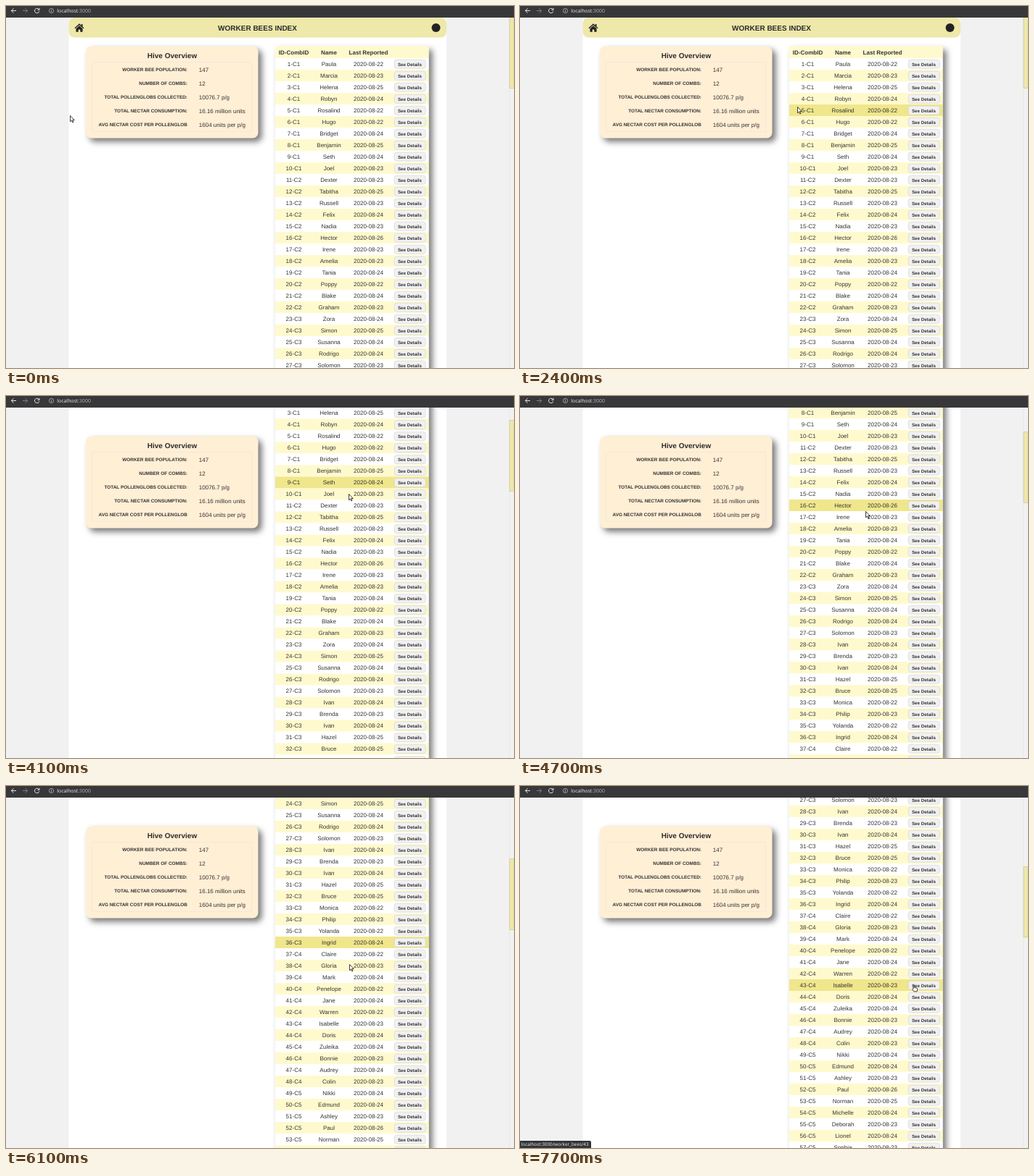
Animation, 700 px wide and 500 px high, one loop 8000 ms. Source, as an HTML page:

```html
<!DOCTYPE html>
<html lang="en">
<head>
<meta charset="utf-8">
<title>Worker Bees Index</title>
<style>
html, body { margin: 0; height: 100%; overflow: hidden; background: #f1f1f1; }
svg { display: block; width: 100vw; height: 100vh; }
text { font: 8px "Liberation Sans", Arial, sans-serif; fill: #333; text-rendering: geometricPrecision; }
.b { font-weight: bold; }
.h { font-weight: bold; font-size: 10px; fill: #2b2b2b; }
.l { font-weight: bold; font-size: 6.43px; }
.d { font-weight: bold; font-size: 6.2px; }
.ui { font: 6.86px "Noto Sans", sans-serif; fill: #e4e4e4; }
.m { text-anchor: middle; }
.e { text-anchor: end; }
.shade { filter: drop-shadow(5px 5px 4px #777); }
</style>
</head>
<body>
<svg viewBox="0 0 700 500">
  <rect x="86.5" width="520.5" height="500" fill="#fff"/>
  <g id="page">
    <rect x="86.5" y="16" width="520.5" height="27.5" rx="8" fill="#eee8aa"/>
    <path d="M94.5 30.2 101 24.3l2.8 2.5v-1.7h1.7v3.3l2 1.8-.9 1-5.6-5-5.6 5zM96.5 31.2l4.5-4 4.5 4v4.6h-3.2v-3.4h-2.6v3.4h-3.2z" fill="#222"/>
    <circle cx="592.5" cy="30" r="6" fill="#222"/>
    <text class="h m" x="346.5" y="33.5">WORKER BEES INDEX</text>
    <rect class="shade" x="371" y="55.5" width="211.5" height="1100" fill="#fff"/>
    <rect x="371" y="55.5" width="211.5" height="16.5" fill="#fffacd"/>
    <text class="b m" x="396.5" y="66.6">ID-CombID</text>
    <text class="b m" x="445" y="66.6">Name</text>
    <text class="b m" x="499.5" y="66.6">Last Reported</text>
    <g id="rows"></g>
  </g>
  <g id="card">
    <rect class="shade" x="110" y="55.5" width="237.5" height="127" rx="7.5" fill="#ffefd5"/>
    <rect x="118.7" y="77.7" width="220" height="96" fill="none" stroke="#eee6da" stroke-width=".7"/>
    <text class="h m" x="229" y="72.2">Hive Overview</text>
  </g>
  <rect x="693.5" y="16" width="6.5" height="484" fill="#f1f1f1"/>
  <path d="M693.7 16V500" stroke="#ddd" stroke-width=".5"/>
  <rect id="thumb" x="694" y="16" width="6" height="97.5" fill="#eee8aa" stroke="#bbb58c" stroke-width=".5"/>
  <rect width="700" height="16" fill="#38383a"/>
  <g fill="none" stroke="#e8e8e8" stroke-width="1">
    <path d="M14 6.5H7.5M10.5 3.3 7.3 6.5l3.2 3.2"/>
    <path d="M23 6.5h6.500M26.500 3.300l3.200 3.200-3.200 3.200" stroke="#808083"/>
    <path d="M45.200 4.500a3.200 3.200 0 1 0 .6 2.800M46 2.900v2.500h-2.500"/>
    <circle cx="62.500" cy="6.500" r="3.100" stroke="#ccc" stroke-width=".7"/>
    <path d="M62.500 6v2.200M62.500 4.600v.8" stroke="#ccc" stroke-width=".8"/>
  </g>
  <text class="ui" x="70.3" y="9">localhost<tspan fill="#b0b0b2">:3000</tspan></text>
  <g id="status">
    <path d="M0 490H96q2 0 2 2v8H0z" fill="#343538"/>
    <text class="ui" id="link" x="1.7" y="497.300" style="font-size:6.35px"></text>
  </g>
  <g fill="#fff" stroke="#111" stroke-width=".8" stroke-linejoin="round">
    <path id="arrow" d="M.5.5V8.800L2.400 7 3.700 9.900 5 9.300 3.700 6.500H6.200z"/>
    <path id="hand" d="M-.8 5V.8q.8-1 1.600 0V3.500l3 .7q.9.3.8 1.300L4.100 8.800H-.2L-2.300 6q0-1 .8-.9z"/>
  </g>
</svg>
<script>
const $ = id => document.getElementById(id);

const names = `Paula Marcia Helena Robyn Rosalind Hugo Bridget Benjamin Seth Joel
Dexter Tabitha Russell Felix Nadia Hector Irene Amelia Tania Poppy Blake Graham
Zora Simon Susanna Rodrigo Solomon Ivan Brenda Ivan Hazel Bruce Monica Philip Yolanda Ingrid
Claire Gloria Mark Penelope Jane Warren Isabelle Doris Zuleika Bonnie Audrey Colin
Nikki Edmund Ashley Paul Norman Michelle Deborah Lionel Sophia Trevor`.split(/\s+/);
const days = "2354224543353436334243454434345523242342423443434436543434";
const combStarts = [1, 11, 23, 37, 49];

const stripe = n => n % 2 ? "#fff" : "#fffacd";
$("rows").innerHTML = names.map((name, i) => {
  const n = i + 1, top = 56 + 16 * n, base = top + 10.7;
  const comb = combStarts.filter(start => start <= n).length;
  return `<rect x="371" y="${top}" width="211.5" height="16" fill="${stripe(n)}"/>
    <text class="m" x="396.5" y="${base}">${n}-C${comb}</text>
    <text class="m" x="445" y="${base}">${name}</text>
    <text class="m" x="499.5" y="${base}">2020-08-2${days[i]}</text>
    <rect x="535.2" y="${top + 2.2}" width="43" height="12" rx="3" fill="#f1f1f1" stroke="#d0d0d0" stroke-width=".6"/>
    <text class="d m" x="556.5" y="${top + 10.5}">See Details</text>`;
}).join("");
const bands = [...$("rows").querySelectorAll("rect[x='371']")];

$("card").innerHTML += [
  ["WORKER BEE POPULATION:", "147"],
  ["NUMBER OF COMBS:", "12"],
  ["TOTAL POLLENGLOBS COLLECTED:", "10076.7 p/g"],
  ["TOTAL NECTAR CONSUMPTION:", "16.16 million units"],
  ["AVG NECTAR COST PER POLLENGLOB", "1604 units per p/g"]
].map(([label, value], i) =>
  `<text class="l e" x="250" y="${90.4 + 19 * i}">${label}</text>
   <text x="265.800" y="${90.5 + 19 * i}">${value}</text>`).join("");

// [ms, x, y] of the pointer tip
const pointer = [
  [0, 88, 151], [200, 203, 187], [400, 203, 187], [700, 231, 91], [800, 231, 91],
  [1100, 243, 84], [1400, 280, 125], [1700, 277, 141], [2000, 310, 168], [2200, 360, 160],
  [2300, 380, 150], [2400, 382, 139], [3000, 382, 139], [3100, 440, 97], [3200, 440, 97],
  [3700, 472, 135], [4200, 472, 135], [4700, 476, 159], [4900, 476, 159], [5300, 474, 220],
  [5400, 474, 220], [5800, 473, 246], [6300, 473, 246], [6600, 474, 303], [6900, 474, 303],
  [7500, 543, 276], [7700, 543, 275]
];
// [ms, page offset]
const scroll = [
  [3400, 0], [3700, 45], [3800, 53], [3900, 70], [4000, 70], [4100, 88.5], [4200, 88.5],
  [4300, 106], [4400, 117], [4500, 155], [4600, 159], [4700, 169], [4800, 205], [4900, 205],
  [5000, 212], [5100, 262], [5200, 318], [5400, 318], [5500, 330], [5700, 365], [5800, 371],
  [5900, 395], [6000, 395], [6100, 424], [6200, 433], [6300, 433], [6400, 462], [6500, 470],
  [6600, 477]
];

function at(keys, t, k = 1) {
  const i = keys.findIndex(key => key[0] > t);
  if (i < 0) return keys[keys.length - 1][k];
  if (i === 0) return keys[0][k];
  const a = keys[i - 1], b = keys[i];
  return a[k] + (b[k] - a[k]) * (t - a[0]) / (b[0] - a[0]);
}

const move = (id, x, y) => $(id).setAttribute("transform", `translate(${x} ${y})`);
const show = (id, on) => $(id).setAttribute("visibility", on ? "visible" : "hidden");

function draw(now) {
  const t = Math.floor(now % 8000 / 100) * 100;
  const x = at(pointer, t), y = at(pointer, t, 2), top = at(scroll, t);
  // the hovered row trails the scrolling a little
  const row = x > 371 && x < 582 ? Math.floor((y + at(scroll, t - 200) - 56) / 16) : 0;
  const onButton = x >= 535 && x <= 578;
  move("page", 0, -top);
  move("thumb", 0, top * 0.2);
  bands.forEach((band, i) => band.setAttribute("fill", i + 1 === row ? "#f0e68c" : stripe(i + 1)));
  move("arrow", x, y);
  move("hand", x, y);
  show("arrow", !onButton);
  show("hand", onButton);
  show("status", onButton);
  $("link").textContent = "localhost:3000/worker_bees/" + row;
  requestAnimationFrame(draw);
}
requestAnimationFrame(draw);
</script>
</body>
</html>
```
